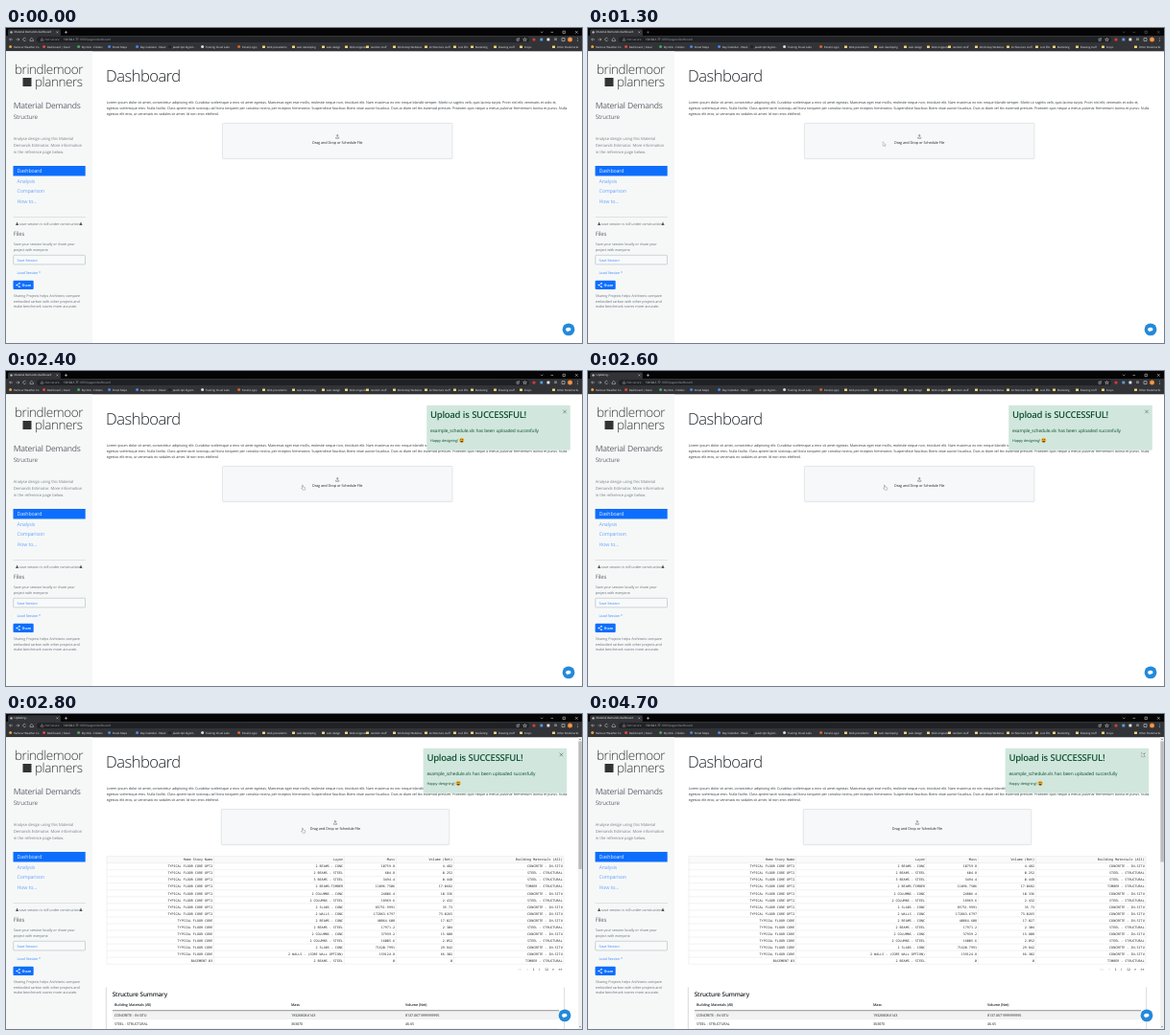
An HTML page that plays this animation: 600x329 px, repeating every 5.2 s.

```html
<!DOCTYPE html>
<html lang="en">
<head>
<meta charset="utf-8">
<title>Dashboard</title>
<style>
  html, body { margin: 0; width: 100%; height: 100%; overflow: hidden; background: #fff; }
  svg { display: block; width: 600px; height: 329px; }
  text {
    font-family: "Open Sans", "Noto Sans", sans-serif;
    letter-spacing: -.032em; word-spacing: .05em;
    text-rendering: geometricPrecision; white-space: pre;
  }
  .light { font-weight: 300; }
  .bold { font-weight: 600; }
  .mid { text-anchor: middle; }
  .mono { font-family: "Noto Sans Mono", "DejaVu Sans Mono", monospace; letter-spacing: 0; word-spacing: 0; text-anchor: end; }
  .line { fill: none; stroke-width: .5; }
</style>
</head>
<body>
<svg viewBox="0 0 600 329" fill="#212529"></svg>
<script>
const LOOP = 5200, STEP = 100;
const BLUE = '#0d6efd', GREEN = '#0f5132';

const text = (x, y, size, str, fill = '#212529', cls = '') =>
  `<text x="${x}" y="${y}" font-size="${size}" fill="${fill}" class="${cls}">${str}</text>`;
const rect = (x, y, w, h, fill, extra = '') =>
  `<rect x="${x}" y="${y}" width="${w}" height="${h}" fill="${fill}" ${extra}/>`;
const dot = (x, y, r, fill) => `<circle cx="${x}" cy="${y}" r="${r}" fill="${fill}"/>`;
const line = (d, stroke, extra = '') => `<path class="line" d="${d}" stroke="${stroke}" ${extra}/>`;
const group = (id, ...parts) => `<g id="${id}">${parts.join('')}</g>`;
const lines = (x, y, step, size, fill, rows) =>
  rows.map((row, i) => text(x, y + i * step, size, row, fill)).join('');

function browser() {
  const pale = '#d5d7da', yellow = '#f6d675';
  const bookmarks = [
    [3, 'Harbour Weather Co', '#e8a33d'], [38, 'Dashboard | Easel', '#e04a3a'],
    [74, 'My Disk - Folders', '#4aa564'], [106, 'Street Maps', '#4a86e8'],
    [135, 'Day Calendar - Week', '#4a86e8'], [169, 'JavaScript Algorit...', '#222'],
    [203, 'Training Cloud Labs', '#ddd'], [241, 'Panel (Logo)', '#e0632a'],
    [267, 'Web precedents'], [298, 'web developing'], [329, 'web design'], [353, 'Web snippets'],
    [375, 'random stuff'], [403, 'Workshop Websites'], [436, 'Architecture stuff'], [466, 'cool lifts'],
    [484, 'Marketing'], [508, 'Drawing stuff'], [535, 'Crops'], [569, 'Other Bookmarks']
  ];
  return rect(0, 0, 600, 24.3, '#323337') + rect(0, 0, 600, 8, '#050505') +
    rect(2, 1.2, 55, 7, '#323337', 'rx="1.5"') + dot(5.5, 4.4, 1.2, '#b9bcc0') +
    `<text id="tab" x="8.6" y="5.3" font-size="2.95" fill="#eee"></text>` +
    line('M52.5 3.5l1.8 1.8m0-1.8l-1.8 1.8', pale) +
    group('controls', line('M61 4.4h3M62.5 2.9v3M557 3.7l1.2 1.2l1.2-1.2M567.5 4.4h2.6M580 3.2h2.4v2.4h-2.4zM593 3.1l2.6 2.6m0-2.6l-2.6 2.6', '#eee')) +
    line('M7 12H3.6l1.4-1.4M3.6 12l1.4 1.4M10.5 12h3.4l-1.4-1.4M13.9 12l-1.4 1.4M20.6 11a1.6 1.6 0 1 0 .2 1.6M25 12l1.7-1.6l1.7 1.6v1.6h-3.4z', pale) +
    rect(32, 9.2, 513, 5.8, '#202124', 'rx="2.9"') +
    line('M36 13.2l1.5-2.6l1.5 2.6z', '#aaa') + text(40.5, 13.1, 3.1, 'Not secure', '#9aa0a6') +
    text(60, 13.1, 3.1, '10.102.1.77', '#eee') + text(76.5, 13.1, 3.1, ':8050/pages/dashboard', '#9aa0a6') +
    line('M532 11.2h2.2v2.2h-2.2zM533.5 11.5l1.5-1.2M540.5 10.3l.6 1.3h1.3l-1 .9l.4 1.3l-1.3-.8l-1.3.8l.4-1.3l-1-.9h1.3z', pale) +
    dot(550, 12.1, 1.6, '#d93a35') + rect(556.4, 10.6, 2.8, 2.8, '#56a0e8') + rect(563.5, 10.6, 2.8, 2.8, '#eee') +
    line('M571 11h3M571 12.3h3M579 10.6h3v3h-3z', '#eee') + dot(587.5, 12.1, 2.5, '#ed8936') +
    text(587.5, 13, 2.8, 'z', '#fff', 'mid') +
    [10.7, 12.1, 13.5].map(y => dot(595.3, y, .4, '#eee')).join('') +
    bookmarks.map(([x, name, color]) =>
      (color ? dot(x + 1.6, 19.6, 1.5, color) : rect(x, 18.4, 3, 2.5, yellow, 'rx=".4"')) +
      text(x + 4.8, 20.6, 2.9, name, '#e3e5e8')).join('');
}

function sidebar() {
  const warn = x => `<path d="M${x} 206l1.6-3.4l1.6 3.4z" fill="#555"/>`;
  return rect(0, 24.3, 90, 304.7, '#f6f8f8') +
    text(9, 48, 13.5, 'brindlemoor', '#333', 'light') + rect(17.5, 52, 9, 9, '#333') +
    text(30, 60.5, 13.5, 'planners', '#333', 'light') +
    text(7.8, 84.2, 8.6, 'Material Demands', '#5f666c') + text(7.8, 95, 6.2, 'Structure', '#5f666c') +
    lines(7.8, 116.6, 7, 4.2, '#7c848b',
      ['Analyse design using this Material', 'Demands Estimator. More information', 'in the reference page below.']) +
    rect(7.5, 144, 75.2, 10.5, BLUE) + text(11.5, 151.3, 5.3, 'Dashboard', '#e8f1ff') +
    lines(11.5, 161.9, 10.5, 5.3, '#6aa5fb', ['Analysis', 'Comparison', 'How to...']) +
    line('M7.5 197.5H83', '#c4c7ca') + warn(10) + warn(76.4) +
    text(13.8, 205.8, 3.75, 'save session is still under construction', '#6c757d') +
    text(7.8, 217.2, 6, 'Files', '#5f666c') +
    lines(7.8, 226.8, 5.7, 3.75, '#6c757d', ['Save your session locally or share your', 'project with everyone.']) +
    rect(7.7, 237.3, 74.8, 9.6, '#f8fafa', 'rx=".8" stroke="#a3abb1" stroke-width=".5"') +
    text(11.5, 243.7, 3.75, 'Save Session', '#3f8bfd') + text(11.5, 257, 3.75, 'Load Session *', '#3f8bfd') +
    rect(7.5, 263.8, 21.2, 9.2, BLUE, 'rx="1"') +
    line('M14 266.8l-2.8 1.7l2.8 1.7', '#fff') + dot(11.2, 268.5, .8, '#fff') + dot(14, 266.8, .8, '#fff') + dot(14, 270.2, .8, '#fff') +
    text(16.4, 269.9, 3.75, 'Share', '#fff', 'bold') +
    lines(7.8, 281, 5.65, 3.75, '#6c757d',
      ['Sharing Projects helps Architects compare', 'embodied carbon with other projects and', 'make benchmark scores more accurate.']);
}

const intro = () => text(104, 56.4, 16.6, 'Dashboard', '#212529', 'light') +
  lines(104.8, 79.3, 5.65, 3.75, '#3a3f44', [
    'Lorem ipsum dolor sit amet, consectetur adipiscing elit. Curabitur scelerisque a eros sit amet egestas. Maecenas eget erat mollis, molestie neque non, tincidunt elit. Nam maximus ex nec neque blandit semper. Morbi ut sagittis velit, quis lacinia turpis. Proin nisl elit, venenatis et odio et,',
    'egestas scelerisque eros. Nulla facilisi. Class aptent taciti sociosqu ad litora torquent per conubia nostra, per inceptos himenaeos. Suspendisse faucibus libero vitae auctor faucibus. Duis at diam vel leo euismod pretium. Praesent quis neque a metus pulvinar fermentum lacinia et purus. Nulla',
    'egestas elit eros, ut venenatis ex sodales sit amet. Id non eros eleifend.'
  ]);

const dropZone = (id, cx, w) => group(id,
  rect(cx - w / 2, 100.2, w, 37, '#0000000d', 'rx="1"'),
  rect(cx - w / 2, 99.5, w, 36.8, '#f6f8f9', 'rx=".8" stroke="#d3d9dc" stroke-width=".6"'),
  line(`M${cx - 1.6} 114.2v1h3.2v-1M${cx} 114.2v-2.7m-1.2 1.2l1.2-1.2l1.2 1.2`, '#444'),
  text(cx, 121, 3.8, 'Drag and Drop or Schedule File', '#212529', 'mid'));

function rawTable() {
  const edges = [105, 216.5, 352.3, 406.3, 466.3, 581], top = 148.6, rowH = 7.04;
  const kinds = { C: 'CONCRETE - IN-SITU', S: 'STEEL - STRUCTURAL', T: 'TIMBER - STRUCTURAL' };
  const data = [
    ['2 BEAMS - CONC', '10759.8', '4.482', 'C'], ['2 BEAMS - STEEL', '604.8', '0.252', 'S'],
    ['3 BEAMS - STEEL', '3494.4', '0.448', 'S'], ['2 BEAMS-TIMBER', '11096.7506', '17.0682', 'T'],
    ['2 COLUMNS - CONC', '24806.4', '10.336', 'C'], ['2 COLUMNS - STEEL', '18969.6', '2.432', 'S'],
    ['2 SLABS - CONC', '85751.9991', '35.73', 'C'], ['2 WALLS - CONC', '172863.6797', '73.0265', 'C'],
    ['2 BEAMS - CONC', '40864.608', '17.027', 'C'], ['2 BEAMS - STEEL', '17971.2', '2.304', 'S'],
    ['2 COLUMNS - CONC', '37939.2', '15.808', 'C'], ['2 COLUMNS - STEEL', '16005.6', '2.052', 'S'],
    ['2 SLABS - CONC', '71620.7991', '29.842', 'C'], ['2 WALLS - (CORE WALL OPTION)', '159124.8', '66.302', 'C'],
    ['2 BEAMS - STEEL', '0', '0', 'T']
  ];
  const story = i => i < 8 ? 'TYPICAL FLOOR CORE OPT2' : i < 14 ? 'TYPICAL FLOOR CORE' : 'BASEMENT 03';
  const rows = [['Home Story Name', 'Layer', 'Mass', 'Volume (Net)', 'Building Materials (All)'],
    ...data.map(([layer, mass, volume, kind], i) => [story(i), layer, mass, volume, kinds[kind]])];
  const bottom = top + rows.length * rowH;
  let grid = edges.map(x => `M${x} ${top}V${bottom}`).join('');
  for (let i = 0; i <= rows.length; i++) grid += `M105 ${top + i * rowH}H581`;
  const pager = [['&lt;&lt;', 537, '#aaa'], ['&lt;', 544, '#aaa'], ['1', 550.5], ['/', 556.5], ['12', 565], ['&gt;', 571], ['&gt;&gt;', 579.5]];
  return group('raw', rect(105, top, 476, rowH, '#fafafa'), line(grid, '#dadada', 'style="stroke-width:.35"'),
    ...rows.map((row, r) => row.map((cell, c) =>
      text(edges[c + 1] - 1.3, top + r * rowH + 4.7, 3.4, cell, '#222', 'mono')).join('')),
    ...pager.map(([s, x, fill = '#222'], i) => text(x, 268.3, 3.4, s, fill, i > 4 ? 'mono bold' : 'mono')));
}

function card(y, h, title, xs, head, rows) {
  const first = y + 26, rowH = 9.5;
  const shadow = [3, 2, 1].map(d => rect(105 - d / 2, y + 1, 476 + d, h + d, '#0000000d', 'rx="1.5"')).join('');
  return shadow + rect(105, y, 476, h, '#fff', 'rx="1"') +
    text(110.8, y + 11.6, 6.4, title, '#212529', 'bold') +
    head.map((s, i) => text(xs[i], y + 21.7, 3.75, s, '#212529', 'bold')).join('') +
    rows.map((row, r) => rect(111, first + r * rowH, 465, rowH, r % 2 ? '#fff' : '#f2f2f2') +
      line(`M111 ${first + (r + 1) * rowH}H576`, '#dee2e6') +
      row.map((s, i) => text(xs[i], first + r * rowH + 6, 3.75, s)).join('')).join('') +
    line(`M111 ${first}H576`, '#333');
}

function field(y, label, hint) {
  return text(110.8, y, 5, label, '#212529', 'bold') +
    rect(110.9, y + 3, 116.4, 8.9, '#fff', 'rx="1.2" stroke="#e4606d" stroke-width=".9"') +
    text(114, y + 8.8, 3.9, hint, '#858c93');
}

function cards() {
  const names = ['CONCRETE - IN-SITU', 'STEEL - STRUCTURAL', 'TIMBER - STRUCTURAL'];
  const rows = values => values.map((v, i) => [names[i], ...v]);
  return group('cards',
    card(148.7, 62.8, 'Structure Summary', [113, 297, 416], ['Building Materials (All)', 'Mass', 'Volume (Net)'],
      rows([['19326808.6143', '8137.0671999999995'], ['363870', '46.65'], ['4743222.5375', '7917.2741']])),
    card(224, 130, 'Embodied Carbon(EC) calculation', [113, 242.5, 371.5, 478],
      ['Materials', 'Amber Leaf (kgCO2e)', 'LOMA EC (kgCO2e)', 'ICE EC (kgCO2e)'],
      rows([['5,233,134.21', '4,882,340.32', '3,364,030.91'], ['1,055,223.00', '1,055,223.00', '563,998.50'],
        ['5,038,402.80', '12,053,676.90', '2,419,043.49']])),
    field(298, 'Design Name:', "What's the project Name?"),
    field(318.2, 'GFA of Design:', "What's the gross floor area (gfa)?"));
}

const toast = () => group('toast',
  rect(438.2, 35.8, 149.6, 47, '#d1e7dd', 'rx="1"'),
  text(442, 49.1, 9.55, 'Upload is SUCCESSFUL!', GREEN, 'bold'),
  text(442, 64, 4.87, 'example_schedule.xls has been uploaded succesfully', GREEN),
  text(442, 73.9, 3.85, 'Happy designing!', GREEN),
  dot(474.7, 72.3, 2.5, '#e8b634'), dot(473.8, 71.6, .6, '#6b4a1b'), dot(475.6, 71.6, .6, '#6b4a1b'),
  '<path d="M473.2 73h3a1.5 1.5 0 0 1-3 0z" fill="#7a3b1b"/>',
  line('M580.2 40.7l3.6 3.6m0-3.6l-3.6 3.6', '#000', 'id="close" style="stroke-width:.7"'));

const overlay = () =>
  group('scroll', rect(596, 24.3, 4, 304.7, '#f1f1f1'),
    '<path d="M597 27l1-1.3l1 1.3zM597 326.3l1 1.3l1-1.3z" fill="#666"/>',
    rect(596.4, 28.5, 3.4, 10, '#bcbcbc', 'id="thumb"')) +
  group('chat', dot(586, 314.9, 6.4, '#2389da'),
    '<path d="M586 312.7c3.3 0 3.3 3.9 0 3.9l-1.5 1v-1.1c-2.2-.6-1.9-3.8 1.5-3.8z" fill="#fff"/>') +
  group('cursor',
    '<path id="arrow" d="M0 0v4.3l1-.9l.7 1.6l.7-.3l-.7-1.5h1.4z" fill="#fff" stroke="#777" stroke-width=".35"/>',
    '<path id="hand" d="M0 .2q.6-.5.9.2v1.7l2 .5q.5.2.3 1l-.4 1.6h-2.2l-1.5-1.8q.2-.6.9 0z" fill="#fff" stroke="#555" stroke-width=".35"/>');

document.querySelector('svg').innerHTML = rect(0, 0, 600, 329, '#fff') + browser() + sidebar() + intro() +
  dropZone('wideDrop', 345.2, 239.6) + dropZone('narrowDrop', 343, 237.6) +
  cards() + rawTable() + toast() + overlay();

const $ = id => document.getElementById(id);
const set = (id, name, value) => $(id).setAttribute(name, value);
const show = (id, on, opacity = 1) => set(id, 'opacity', on ? opacity : 0);
const shift = (id, x, y = 0) => set(id, 'transform', `translate(${x} ${y})`);
const progress = (t, from, to) => Math.min(1, Math.max(0, (t - from) / (to - from)));
const smooth = u => u * u * (3 - 2 * u);
const mix = (a, b, u) => a + (b - a) * u;

function cursorAt(t) {
  if (t < 2300) {
    const u = Math.sin(progress(t, 900, 1300) * Math.PI / 2);
    return [mix(597, 307.2, u), mix(173, 118.8, u)];
  }
  const x = mix(308.5, 577, smooth(progress(t, 3300, 3900)));
  const y = mix(119, 35.5, smooth(progress(t, 3300, 3800))) + 5 * progress(t, 3800, 3900);
  return [x, y];
}

function draw(now) {
  const t = Math.floor(now % LOOP / STEP) * STEP;
  const loaded = t >= 2700, detailed = t >= 2800, hand = t >= 2300 && t < 3400;
  $('tab').textContent = t >= 2600 && t < 3100 ? 'Updating...' : 'Material Demands dashboard';
  show('controls', true, t >= 700 && t < 2300 ? .45 : 1);
  show('wideDrop', !loaded);
  show('narrowDrop', loaded);
  show('cards', loaded);
  shift('cards', 0, detailed ? 135 : 0);
  show('raw', detailed);
  show('toast', t >= 2300, t < 2400 ? .5 : 1);
  shift('toast', loaded ? -3.6 : 0);
  set('close', 'opacity', mix(.5, .75, progress(t, 3900, 4200)));
  show('scroll', loaded);
  set('thumb', 'height', t >= 3100 ? 126 : detailed ? 133.5 : 166.5);
  shift('chat', loaded ? -4 : 0);
  show('cursor', t >= 900);
  shift('cursor', ...cursorAt(t));
  show('arrow', !hand);
  show('hand', hand);
  requestAnimationFrame(() => draw(performance.now()));
}
draw(0);
</script>
</body>
</html>
```
